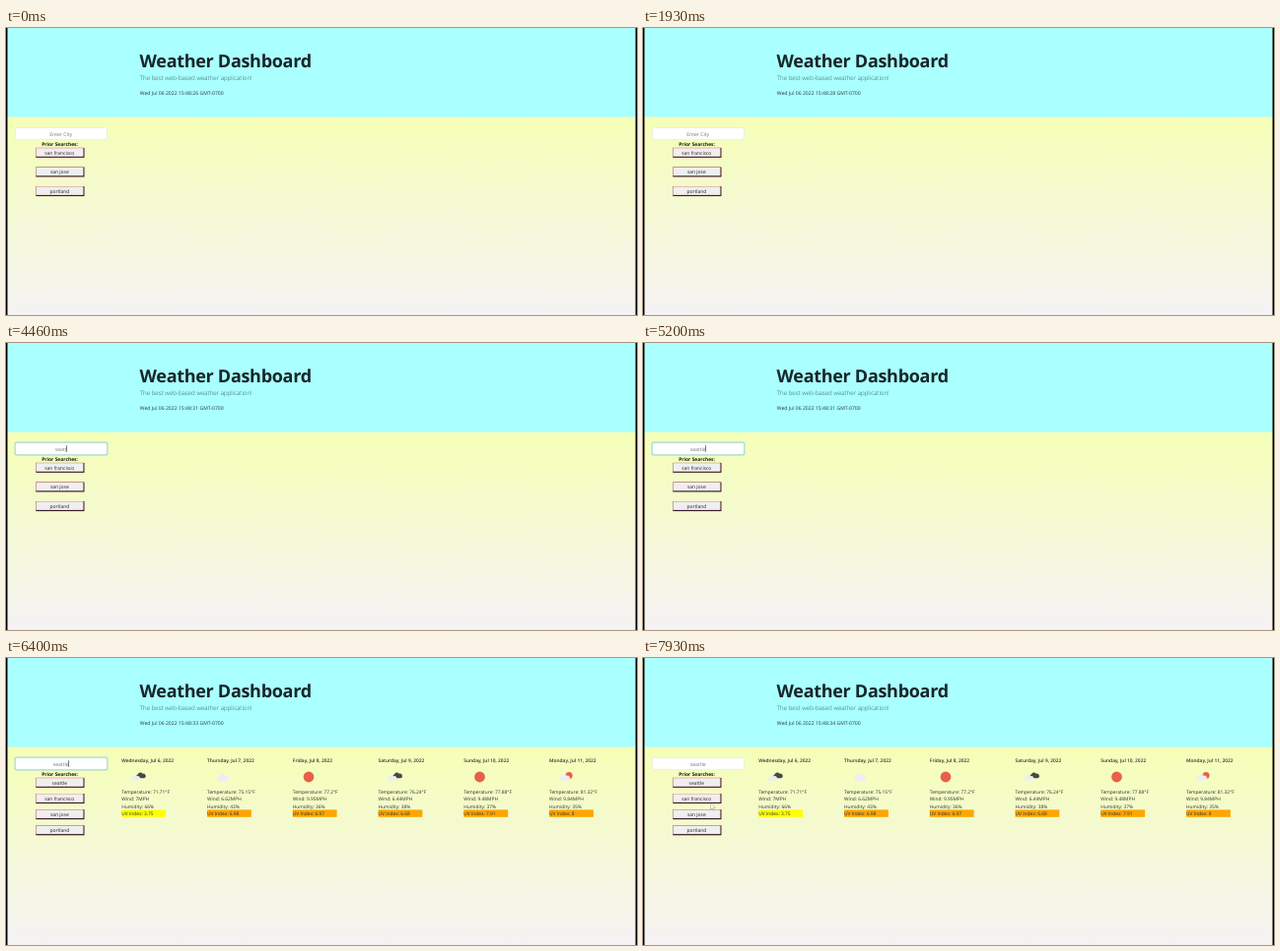
An HTML page that plays this animation: 640 px wide and 292 px high, repeating every 8 s.

```html
<!DOCTYPE html>
<html lang="en">
<head>
<meta charset="utf-8">
<title>Weather Dashboard</title>
<style>
  html, body { margin: 0; width: 100%; height: 100%; overflow: hidden; background: #000; }
  svg { display: block; width: 100%; height: 100%; }
  text { font: 400 4.85px "Open Sans", "Noto Sans", sans-serif; fill: #2b3030; text-rendering: geometricPrecision; white-space: pre; }
  .title { font-size: 18px; font-weight: 700; letter-spacing: -.3px; fill: #17262a; }
  .lead { font-size: 6.2px; font-weight: 300; fill: #2c5558; }
  .clock { font-size: 5.1px; fill: #26393c; }
  .mid { text-anchor: middle; }
  .prior { font-size: 4.95px; font-weight: 700; fill: #15180f; }
  .label { font-size: 4.95px; fill: #222; }
  .entry { font-size: 5.1px; fill: #74777b; }
  .day { font-size: 4.85px; font-weight: 600; }
</style>
</head>
<body>
<svg viewBox="0 0 640 292">
  <defs>
    <linearGradient id="sky" x2="0" y2="1">
      <stop stop-color="#f5ffb6"/><stop offset="1" stop-color="#f4f2f4"/>
    </linearGradient>
    <path id="cloud" d="M-4 3a2.4 2.4 0 0 1-.2-4.7A3.4 3.4 0 0 1 2-2.6 2.8 2.8 0 0 1 4 3z"/>
  </defs>
  <rect x="1.5" width="637" height="91" fill="#aff"/>
  <rect x="1.5" y="90.6" width="637" height="201.4" fill="url(#sky)"/>
  <text class="title" x="135.6" y="39.8">Weather Dashboard</text>
  <text class="lead" x="135.8" y="53.4">The best web-based weather application!</text>
  <text class="clock" id="clock" x="135.8" y="67.7"></text>

  <rect id="glow" x="8.6" y="100.4" width="94.8" height="14" rx="2" fill="#a0d6d2"/>
  <rect id="box" x="9.5" y="101.5" width="93" height="11.9" rx="1.4" fill="#fff" stroke-width=".5"/>
  <text class="entry mid" id="entry" x="55.7" y="109.6"></text>
  <rect id="caret" y="104.2" width=".6" height="6.6" fill="#222"/>
  <text class="prior mid" x="54.6" y="119.5">Prior Searches:</text>
  <g id="before"></g>
  <g id="after"></g>
  <g id="forecast"></g>
  <path id="pointer" d="M0 0v6.6l1.6-1.4 1 2.3 1-.4-1-2.3h2.1z" fill="#fff" stroke="#777" stroke-width=".4"/>
</svg>
<script>
const LOOP = 8000, FOCUS = 3000, SEARCH = 5300, RESULTS = 6250, POINTER = 6600, BLUR = 7500;
const WORD = "seattle", KEYS = [3650, 3850, 4050, 4220, 4400, 4650, 4950];
const $ = id => document.getElementById(id);
const show = (id, on) => $(id).setAttribute("visibility", on ? "visible" : "hidden");

function buttons(cities, step) {
  return cities.map((city, i) => `
    <g transform="translate(30.3 ${121.9 + i * step})">
      <rect width="49.2" height="10" fill="#3a1a28"/>
      <rect width="48" height="8.7" fill="#eba595"/>
      <rect x=".5" y=".5" width="47.5" height="8.2" fill="#efeff0"/>
      <text class="label mid" x="24" y="6.7">${city}</text>
    </g>`).join("");
}

const cloud = (x, y, fill, size = 1) =>
  `<use href="#cloud" transform="translate(${x} ${y}) scale(${size})" fill="${fill}"/>`;
const sun = (x, y, r) => `<circle cx="${x}" cy="${y}" r="${r}" fill="#e8604a"/>`;
const icons = {
  sun: () => sun(16.2, 121, 5.4),
  cloud: () => cloud(16, 122, "#eeeef2"),
  overcast: () => cloud(19.6, 119.8, "#484848", .8) + cloud(14, 122.3, "#eeeef2", .8),
  partly: () => sun(20, 119.6, 3.5) + cloud(15.6, 122, "#eeeef2", .9)
};

const days = [
  ["Wednesday, Jul 6", "overcast", "71.71", "7", 66, "3.75"],
  ["Thursday, Jul 7", "cloud", "75.15", "6.62", 43, "6.98"],
  ["Friday, Jul 8", "sun", "77.2", "9.95", 36, "6.97"],
  ["Saturday, Jul 9", "overcast", "76.24", "6.44", 38, "6.68"],
  ["Sunday, Jul 10", "sun", "77.88", "9.48", 37, "7.91"],
  ["Monday, Jul 11", "partly", "81.32", "9.84", 35, "8"]
];

$("forecast").innerHTML = days.map(([day, icon, temp, wind, humidity, uv], i) => `
  <g transform="translate(${117.3 + i * 86.75} 0)">
    <text class="day" y="106.2">${day}, 2022</text>
    ${icons[icon]()}
    <text y="137.6">Temperature: ${temp}°F</text>
    <text y="145">Wind: ${wind}MPH</text>
    <text y="152.5">Humidity: ${humidity}%</text>
    <rect y="154.4" width="44.8" height="7.4" fill="${uv < 6 ? "#ff0" : "#ffa500"}"/>
    <text y="159.9">UV Index: ${uv}</text>
  </g>`).join("");

const cities = ["san francisco", "san jose", "portland"];
$("before").innerHTML = buttons(cities, 19.6);
$("after").innerHTML = buttons([WORD, ...cities], 16.15);

function draw(t) {
  $("clock").textContent = `Wed Jul 06 2022 15:48:${26 + Math.floor((t + 740) / 1000)} GMT-0700`;

  const typed = WORD.slice(0, KEYS.filter(k => k <= t).length);
  $("entry").textContent = typed || "Enter City";
  const focused = t >= FOCUS && t < BLUR;
  show("glow", focused);
  $("box").setAttribute("stroke", focused ? "#a0d6d2" : "#dde2d4");

  // The caret restarts its blink on every input event.
  const last = Math.max(...[FOCUS, ...KEYS, SEARCH].filter(k => k <= t));
  show("caret", focused && (t - last) % 1060 < 530);
  const half = typed ? $("entry").getComputedTextLength() / 2 : 0;
  $("caret").setAttribute("x", 55.5 + half);

  show("before", t < SEARCH);
  show("after", t >= SEARCH);
  show("forecast", t >= RESULTS);

  const move = Math.min(1, Math.max(0, (t - 7060) / 600));
  show("pointer", t >= POINTER);
  $("pointer").setAttribute("transform", `translate(${70.6 - 2 * move} 147.6)`);
}

const start = performance.now();
function tick() {
  draw((performance.now() - start) % LOOP);
  requestAnimationFrame(tick);
}
tick();
</script>
</body>
</html>
```
